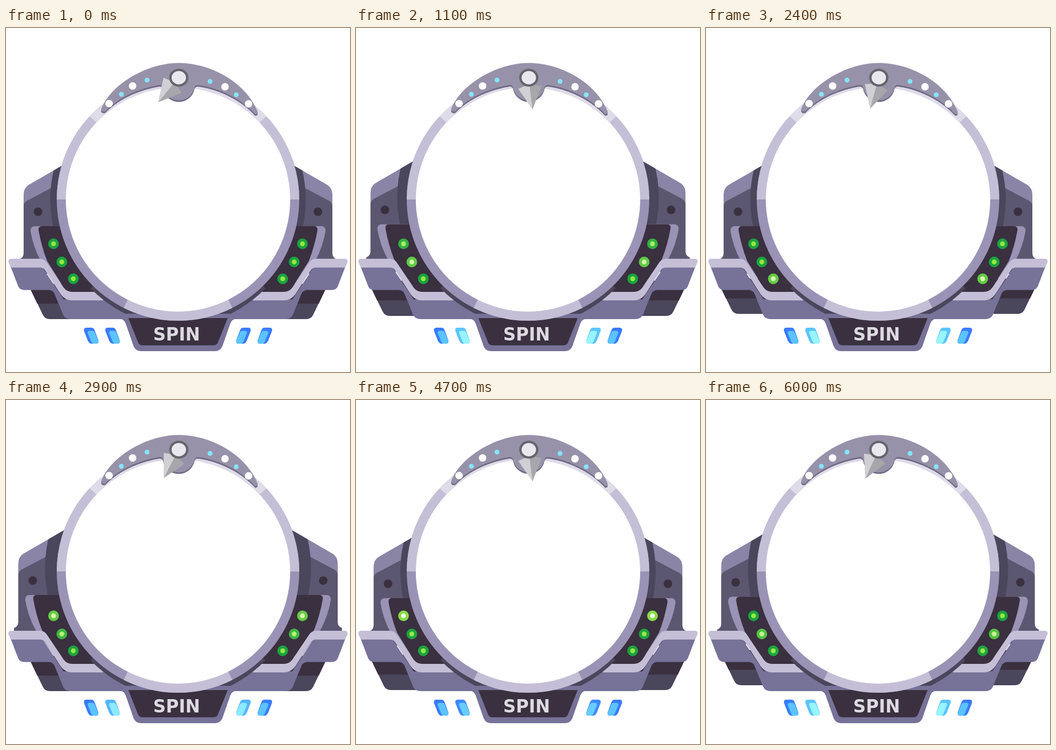
Recreate the animation shown at these times as an HTML page. Size 644x644 px, loop 6100 ms.

```html
<!DOCTYPE html>
<html lang="en">
<head>
<meta charset="utf-8">
<title>Spin wheel frame</title>
<style>
html, body { margin: 0; width: 100%; height: 100%; overflow: hidden; background: #fff; }
svg { display: block; width: 100vw; height: 100vh; }
text { font: bold 33px "DejaVu Sans", sans-serif; }
</style>
</head>
<body>
<svg viewBox="0 0 644 644">
  <defs>
    <clipPath id="wingClip">
      <path id="wingShape" d="M125 246L42 294Q33 300 33 312V422Q33 430 25 433V460H330V246Z"/>
    </clipPath>

    <g id="wing">
      <g clip-path="url(#wingClip)">
        <path d="M0 230H330V470H0Z" fill="#8a84a6"/>
        <path d="M0 470V332H33Q34 326 40 323L95 294V470Z" fill="#5b5770"/>
        <circle cx="322" cy="321" r="239" fill="#4a465b"/>
      </g>
      <circle cx="60" cy="344" r="8" fill="#3a303f"/>
      <path d="M180 371H53Q45 372 46 381Q51 410 65 436L110 500H180Z" fill="#9a93b6"/>
      <path d="M190 371H66Q60 372 61 379Q66 408 77 436L120 505H190Z" fill="#3a303f"/>
    </g>

    <g id="pod">
      <path d="M41 479L69 537Q73 545 82 545H150V479Z" fill="#4a465b"/>
      <path d="M41 479L58.5 516H150V479Z" fill="#3a303f"/>
    </g>

    <g id="platform">
      <path d="M8 445H66L108 508H322V545H121Q111 545 107 537L91 498Q88 490.500 80 490.500H34Q26 490 23 484Z" fill="#777298"/>
      <path d="M10 432H64Q72 432 77 440L108 486Q114 494 124 494H182V510H124Q110 510 102 498L73 453Q70 448.500 64 448.500H14Q9 449 8 446L4.500 438Q4 432 10 432Z" fill="#c4bfd6"/>
    </g>

    <g id="bar">
      <path class="back" d="M150 561H160Q164 561 166 566L173 585Q174 591 168 591H160Q156 591 153 585L146 567Q145 561 150 561Z"/>
      <path class="front" d="M153 571Q152 567 157 567H162Q165 567 166 570L173 586Q174 591 168 591H164Q161 591 159 586Z"/>
    </g>

    <path id="crown" d="M178 152C195 107 262 65.500 323 65.500C386 65.500 450 104 471 156Q472 162 466 161C444 136 404 113 361 107Q355 106 353 111A30 30 0 0 1 294 111Q292 106 286 107C245 114 209 132 186 156Q179 158 178 152Z"/>
  </defs>

  <g id="left"></g>
  <g id="right" transform="translate(644 0) scale(-1 1)"></g>

  <path d="M216 545Q221 546 224 553L239 596Q243 605 253 605H391Q401 605 405 596L420 553Q423 546 428 545V535H216Z" fill="#777298"/>
  <path d="M229 543L247 588Q249 594 256 594H388Q395 594 397 588L415 543Z" fill="#3a303f"/>
  <text x="275.500" y="585" fill="#dcdbe0">SPIN</text>

  <circle cx="322" cy="321" r="227" fill="#9a93b6"/>
  <g fill="none" stroke-width="17">
    <path d="M103.500 321A218.500 218.500 0 0 1 540.500 321" stroke="#c4bfd6"/>
    <path d="M224 516.300A218.500 218.500 0 0 0 420 516.300" stroke="#c4bfd6"/>
    <path d="M163 171A218.500 218.500 0 0 1 481 171" stroke="#dfdbe9"/>
  </g>
  <circle cx="322" cy="321" r="210" fill="#fff"/>

  <use href="#crown" y="3" fill="#706b85"/>
  <use href="#crown" fill="#9792a9"/>
  <g fill="#fff">
    <circle cx="193" cy="141.500" r="7"/><circle cx="237" cy="108.500" r="7"/>
    <circle cx="410" cy="110" r="7"/><circle cx="454" cy="142" r="7"/>
  </g>
  <g fill="#86e4fa">
    <circle cx="216" cy="124" r="4.500"/><circle cx="264" cy="97.500" r="4.500"/>
    <circle cx="382" cy="100" r="4.500"/><circle cx="431" cy="125" r="4.500"/>
  </g>

  <g id="pointer">
    <path d="M0 6L-5 13L-22 18.500L0 60Z" fill="#d0d0d4"/>
    <path d="M0 6L5 13L22 18.500L0 60Z" fill="#a7a7ab"/>
  </g>
  <ellipse cx="323.500" cy="93" rx="18" ry="16.800" fill="#66656b"/>
  <ellipse cx="323.500" cy="93" rx="13.500" ry="12.500" fill="#e9e8ee"/>
</svg>

<script>
const LOOP = 6100, STEP = 100;
const WING = 2433, POD = WING / 2, LIGHT = WING / 4;

const half = `
  <use href="#wing" class="wing"/>
  <use href="#pod" class="pod"/>
  <use href="#platform"/>
  <path d="M162.500 483A233 233 0 0 0 322 554" fill="none" stroke="#4a465b" stroke-width="12" clip-path="inset(0 0 9px 0)"/>
  ${[[89, 404], [104.5, 438], [126, 469.5]].map(([x, y]) =>
    `<g class="led"><circle cx="${x}" cy="${y}" r="10"/><circle cx="${x}" cy="${y}" r="4.500"/></g>`).join("")}
  <g class="bar"></g>
  <g class="bar" transform="translate(40 0)"></g>`;

const $ = id => document.getElementById(id);
const all = (sel, root = document) => [...root.querySelectorAll(sel)];
const sides = [$("left"), $("right")];
for (const side of sides) {
  side.innerHTML = half;
  for (const bar of all(".bar", side)) bar.innerHTML = $("bar").innerHTML;
}

const smooth = u => (1 - Math.cos(Math.PI * u)) / 2;
const bump = (x, mid, w) => Math.abs(x - mid) < w ? smooth(1 - Math.abs(x - mid) / w) : 0;

// Keys are [time, value]; the value eases from key to key.
function track(keys, t, ease = smooth) {
  if (t <= keys[0][0]) return keys[0][1];
  for (let i = 1; i < keys.length; i++) {
    const [a, v] = keys[i - 1], [b, w] = keys[i];
    if (t <= b) return v + (w - v) * ease((t - a) / (b - a));
  }
  return keys[keys.length - 1][1];
}

function mix(a, b, k) {
  const part = (c, s) => c >> s & 255;
  return "rgb(" + [16, 8, 0].map(s =>
    Math.round(part(a, s) + (part(b, s) - part(a, s)) * k)).join() + ")";
}

const LOW = -6.6;
const swing = [[0, 40], [350, LOW], [700, 40], [1100, LOW], [1500, 43], [2165, LOW],
  [2650, 40], [3390, LOW], [3700, 43], [4276, LOW], [4480, 40], [4700, LOW],
  [5100, 40], [5500, LOW], [5840, LOW], [6100, 40]];
const wingPush = [[200, 0], [700, 18], [1350, 0]];
const podX = [[0, 0], [150, -17], [200, -19], [233, -16], [310, -24], [467, -11], [560, 0]];
const podY = [[0, 0], [150, -2], [200, -6], [233, -11], [310, -9], [467, -7], [560, 0]];
const glow = [[425, 0], [485, 1], [588, 1], [608, 0]];

function draw(t) {
  const d = track(wingPush, t % WING);
  const wingMove = `translate(${-d} ${-d * 0.6})`;

  const p = t < 900 ? 0 : (t - 900) % POD;
  const podMove = `translate(${track(podX, p, u => u)} ${track(podY, p, u => u)})`;

  const ph = t % LIGHT;
  const leds = [bump(ph, 438, 80), 0.7 * bump(ph, 502, 70), 0.7 * bump(ph, 575, 58)];
  const bars = [track(glow, (ph + LIGHT / 2) % LIGHT), track(glow, ph)];

  for (const side of sides) {
    side.querySelector(".wing").setAttribute("transform", wingMove);
    side.querySelector(".pod").setAttribute("transform", podMove);
    all(".led", side).forEach((led, i) => {
      led.children[0].setAttribute("fill", mix(0x1ba340, 0x86dc48, leds[i]));
      led.children[1].setAttribute("fill", mix(0x94e83f, 0xf2ffe0, leds[i]));
    });
    all(".bar", side).forEach((bar, i) => {
      bar.children[0].setAttribute("fill", mix(0x3a7bff, 0x5bc4ff, bars[i]));
      bar.children[1].setAttribute("fill", mix(0x5bc4ff, 0x98f4ff, bars[i]));
    });
  }
  $("pointer").setAttribute("transform", `translate(323.500 93) rotate(${track(swing, t)})`);
}

const start = performance.now();
function tick() {
  const t = (performance.now() - start) % LOOP;
  draw(Math.floor(t / STEP) * STEP);
  requestAnimationFrame(tick);
}
tick();
</script>
</body>
</html>
```
